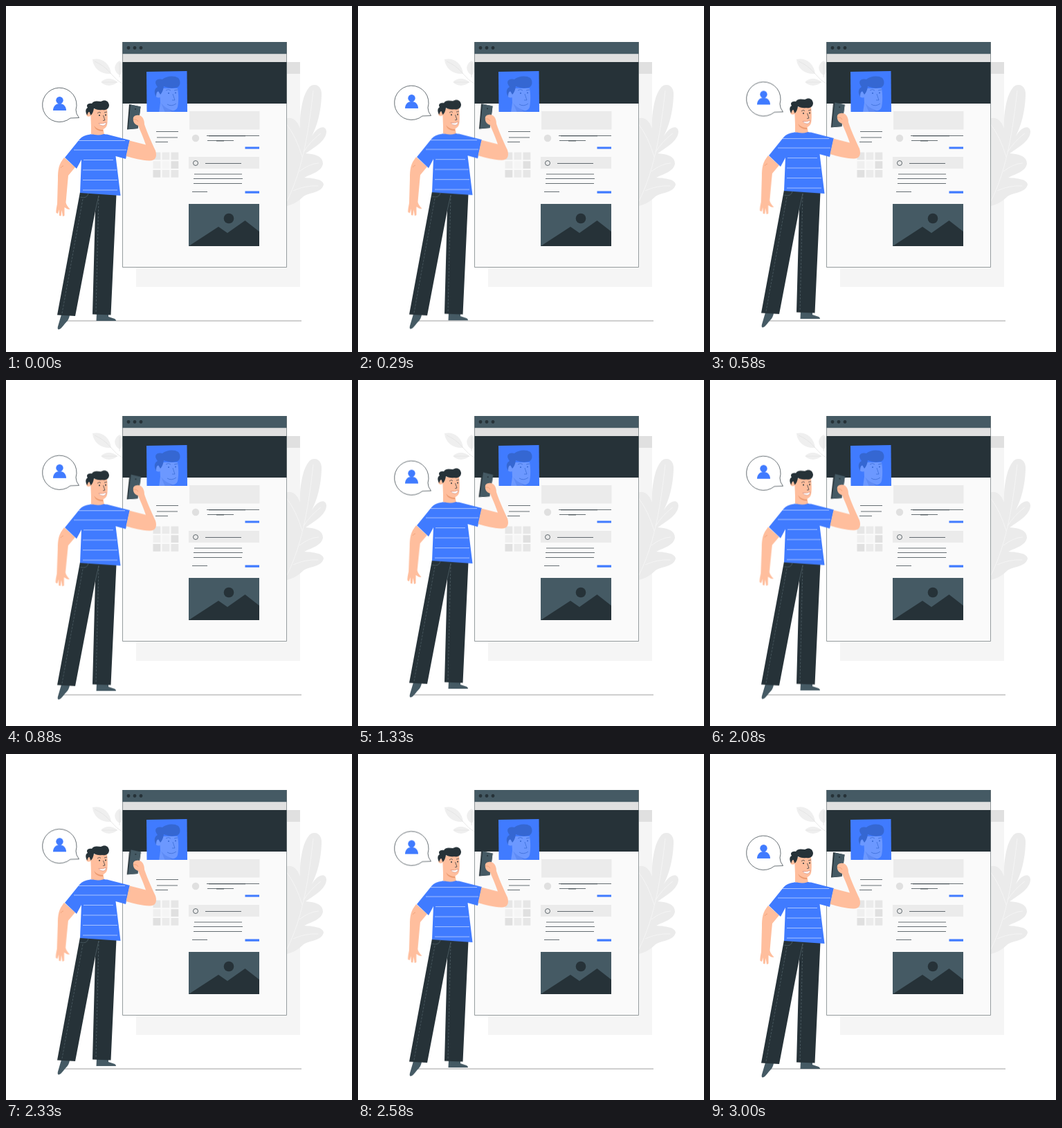
These frames come from a looping animation (500 by 500 pixels, 3040 ms). An HTML page:

```html
<!DOCTYPE html>
<html lang="en">
<head>
<meta charset="utf-8">
<title>Profile page</title>
<style>
  html, body { margin: 0; width: 100%; height: 100%; overflow: hidden; background: #fff; }
  svg { display: block; width: 100vw; height: 100vh; }

  .dark { fill: #263238; }
  .slate { fill: #455a64; }
  .blue { fill: #407bff; }
  .skin { fill: #ffbe9d; }
  .pale { fill: #ebebeb; }
  .grey { fill: #e0e0e0; }
  .line { fill: none; stroke: #263238; stroke-width: .7; }
  .vein { fill: none; stroke: #f7f7f7; stroke-width: .8; }

  /* Half a cycle each way gives a sine-like bob */
  .bob, .turn { animation: rise 1520ms cubic-bezier(.37, 0, .63, 1) infinite alternate; }
  .bubble { animation: rise 760ms cubic-bezier(.37, 0, .63, 1) infinite alternate; }
  .bob { --to: translateY(-9.2px); }
  .bubble { --to: translateY(-9.8px); }
  .phone { --to: rotate(2.5deg); transform-origin: 185px 166px; }
  .arm { --to: rotate(.8deg); transform-origin: 92px 224px; }
  @keyframes rise {
    from { transform: none; }
    to { transform: var(--to); }
  }
</style>
</head>
<body>
<svg viewBox="0 0 500 500">
  <defs>
    <path id="shirt" d="M122 185.500C114 186.500 110 188.500 106 193L85 219L102 235L109 222L107 270L165.500 274L158.500 217L173 221L179 194L146 185.500Z"/>
    <clipPath id="shirtClip"><use href="#shirt"/></clipPath>
    <clipPath id="avatarClip"><path d="M203 95L261.500 94L262 153H203.500Z"/></clipPath>
  </defs>

  <!-- Backdrop -->
  <path fill="#f5f5f5" d="M188 81H425V406H188Z"/>
  <path class="grey" d="M188 81H425V98H188Z"/>
  <g fill="#efefef">
    <path d="M152 98C137 99 126 90 125 77C138 74 150 82 152 98Z"/>
    <path d="M164 100C155 95 155 84 164 79C172 85 171 95 164 100Z"/>
    <path d="M161 110C153 117 143 116 137 110C144 103 154 104 161 110Z"/>
  </g>
  <path class="vein" style="stroke:#e2e2e2" d="M128 80Q142 86 151 97T169 113M164 82V103M139 110H161"/>
  <path class="pale" d="M405 289V163C412 159 421 165 425 177C424 152 430 122 441 115C451 111 457 119 456 130C455 153 450 172 442 188C451 173 462 172 463 181C463 194 448 203 433 213C445 214 458 216 458 228C456 239 443 242 431 248C444 249 458 250 459 258C456 270 440 269 430 275C422 283 415 287 405 289Z"/>
  <path class="vein" d="M444 122C438 175 430 235 405 284M405 170Q420 190 428 218M455 184Q440 195 430 211M452 227Q438 228 424 239M451 260Q432 259 415 267"/>
  <path class="line" stroke-width=".6" d="M81 455H427" style="stroke:#777"/>

  <!-- Browser window -->
  <path fill="#fafafa" d="M168 52H406V378H168Z"/>
  <path class="slate" d="M168 52H406V69.500H168Z"/>
  <path class="grey" d="M168 69.500H406V81H168Z"/>
  <path class="dark" d="M168 81H406V141H168Z"/>
  <g class="dark">
    <circle cx="177" cy="60.500" r="2.400"/><circle cx="186" cy="60.500" r="2.400"/><circle cx="195" cy="60.500" r="2.400"/>
  </g>
  <path class="line" d="M168.500 52V377.500H405.500V52" style="stroke:#6b7478"/>

  <!-- Avatar -->
  <g clip-path="url(#avatarClip)">
    <path class="blue" d="M202 93H263V154H202Z"/>
    <g fill="#6c98ff">
      <circle cx="220.500" cy="128" r="4.500"/>
      <path d="M222 119H248C250 130 249 141 248 146C246 152 240 152 236 150L241 154H221L223 140Z"/>
    </g>
    <path fill="#5583ee" d="M224 140Q229 147 238 150L247 154H230Z" opacity=".6"/>
    <path fill="#3567d2" d="M223 128L220 123Q217 124 217 131C213 124 215 119 219 117C212 108 219 104 226 106C232 101 243 100 249 104C254 110 251 118 245 118C237 120 231 117 228 116Q227 124 223 128Z"/>
    <path class="line" d="M231 122Q235 119 238 122M243 122L248 121M241 127L244 136H240M233 142Q239 146 246 141" style="stroke:#3567d2"/>
    <g fill="#3567d2"><circle cx="235" cy="126" r="1"/><circle cx="245" cy="125.500" r="1"/></g>
  </g>

  <!-- Left column -->
  <path class="line" d="M217 181.500H249M218 190H248M216 196.500H234"/>
  <g id="grid"></g>

  <!-- Feed -->
  <path class="pale" d="M265 152H366.500V178.500H265ZM264 218H366V235H264Z"/>
  <circle class="grey" cx="274" cy="191" r="5.200"/>
  <path class="line" d="M290 187.500H366M291 194.500H329M288 227.500H340M272 243H341M271 249.500H342M271 256.500H341M269 268.500H291"/>
  <path class="line" stroke-width="1" d="M293 187.800H346M304 195H315"/>
  <circle class="line" cx="274" cy="227" r="3.500"/>
  <path class="blue" d="M345.500 203.500H366V206.500H345.500ZM345.500 267.500H366V270.700H345.500Z"/>
  <path class="slate" d="M264 286H366V347H264Z"/>
  <circle class="dark" cx="322" cy="307" r="7.300"/>
  <path class="dark" d="M264 347L307 319L320 328L345.500 310L366 326V347Z"/>

  <!-- Man -->
  <g class="bob">
    <g class="turn arm">
      <path class="skin" d="M84 219C76 229 75 236 75 250L74 286C73 291 72 296 72.500 299L75 300L76.500 294L77 303L79.500 303.500L80.500 295L82 304L84.500 303L84.500 291C86 291 89 295 92.500 293.500C89 290 87 287 86.500 284C88 268 89 255 90 245L100 233Z"/>
      <path class="line" d="M79 234Q81 231 83 231" style="stroke:#eb996e"/>
    </g>

    <path class="slate" d="M80 446L92 447Q91 453 87 457C83 461 80 467 76 467.500Q74 467 75 463ZM131 444H148V449L157 452Q159 453 159 455H130.500Z"/>
    <path class="dark" d="M107 269L74 446.500L100 448L129 296L125 445.500L151.500 446.500L159.500 272Z"/>
    <path class="line" d="M111 279L81 444M134 274L130 443" style="stroke:#55666e" stroke-dasharray="3 2"/>
    <path class="line" d="M107 276Q117 279 119 271M134 274L129 296" style="stroke:#55666e"/>

    <path class="skin" d="M123 160L123 185Q132 189 142 186L140 175Z"/>
    <path class="blue" d="M122 185.500Q132 189 142 185L146 187V196H118Z"/>
    <use href="#shirt" class="blue"/>
    <path class="skin" d="M123.500 184Q132 188.500 140.500 185L140 178H123.500Z"/>
    <path clip-path="url(#shirtClip)" d="M104 194.500H172M98 208H174M112 222.500H155M111 237H160M111 251.500H161M111 266H161" fill="none" stroke="#c5d7ff" stroke-width=".8"/>

    <!-- Head -->
    <g class="skin">
      <circle cx="119.500" cy="156.500" r="3.300"/>
      <path d="M122 149H146C147 158 147 167 146 172C144 178 138 180 132 178L123 174Z"/>
    </g>
    <path d="M127 173Q132 179 140 179L140 181Q130 181 127 173Z" fill="#eb996e"/>
    <path class="dark" d="M122.500 158L120.500 153Q118 153 117.500 158C114 153 115 148 118 147C115 143 119 140 124 141C127 136 133 138 137 138C142 135 148 136 149 143C149 149 144 151 139 150C133 151 130 149 127 148Q126 155 122.500 158Z"/>
    <path class="line" stroke-width="1" d="M132 155Q135 152 137 154.500M142 154L146 153M140.500 158L143 165L140 165.500"/>
    <g class="dark"><circle cx="135" cy="158" r="1"/><circle cx="144" cy="157.500" r="1"/></g>
    <path d="M134 169.500Q140 171 145 168Q144 173 140 173Q136 173 134 169.500Z" fill="#fff" stroke="#b55b52" stroke-width=".4"/>

    <!-- Phone and raised arm -->
    <g class="turn phone">
      <path class="dark" d="M178 142L194.500 145.500L190.500 177L175 178.500Z"/>
      <path class="slate" d="M180 142.500L194.500 145.500L190.500 177L176.500 178Z"/>
      <circle class="dark" cx="187" cy="149" r="1"/>
    </g>
    <path class="skin" d="M178.500 194.500L202 200.500C198 189 194 180 191 173C185 171 183 166 184 161C186 157 192 157 195 159C199 162 200 167 200 171C205 186 212 200 216 209C219 219 215 224 207 223.500C196 223 184 220 173.500 217Z"/>
    <path class="line" d="M184 164Q189 163 191 167" style="stroke:#eb996e"/>
  </g>

  <!-- Speech bubble -->
  <g class="bubble">
    <path class="line" style="fill:#fff" d="M93 162A24.700 24.700 0 1 1 101 150Q101 156 105.500 161.500Z"/>
    <circle class="blue" cx="77.500" cy="136.300" r="5.200"/>
    <path class="blue" d="M68 151C68 145 72 141 77.500 141S87 145 87 151Z"/>
  </g>
</svg>
<script>
  const grid = document.getElementById("grid");
  const tones = ["#e6e6e6", "#ebebeb", "#e6e6e6", "#efefef", "#f5f5f5", "#e0e0e0", "#e0e0e0", "#ebebeb", "#e6e6e6"];
  grid.innerHTML = tones.map((tone, i) =>
    `<rect x="${212.500 + i % 3 * 13}" y="${211.500 + Math.floor(i / 3) * 12.700}" width="10.800" height="10.800" fill="${tone}"/>`
  ).join("");
</script>
</body>
</html>
```
